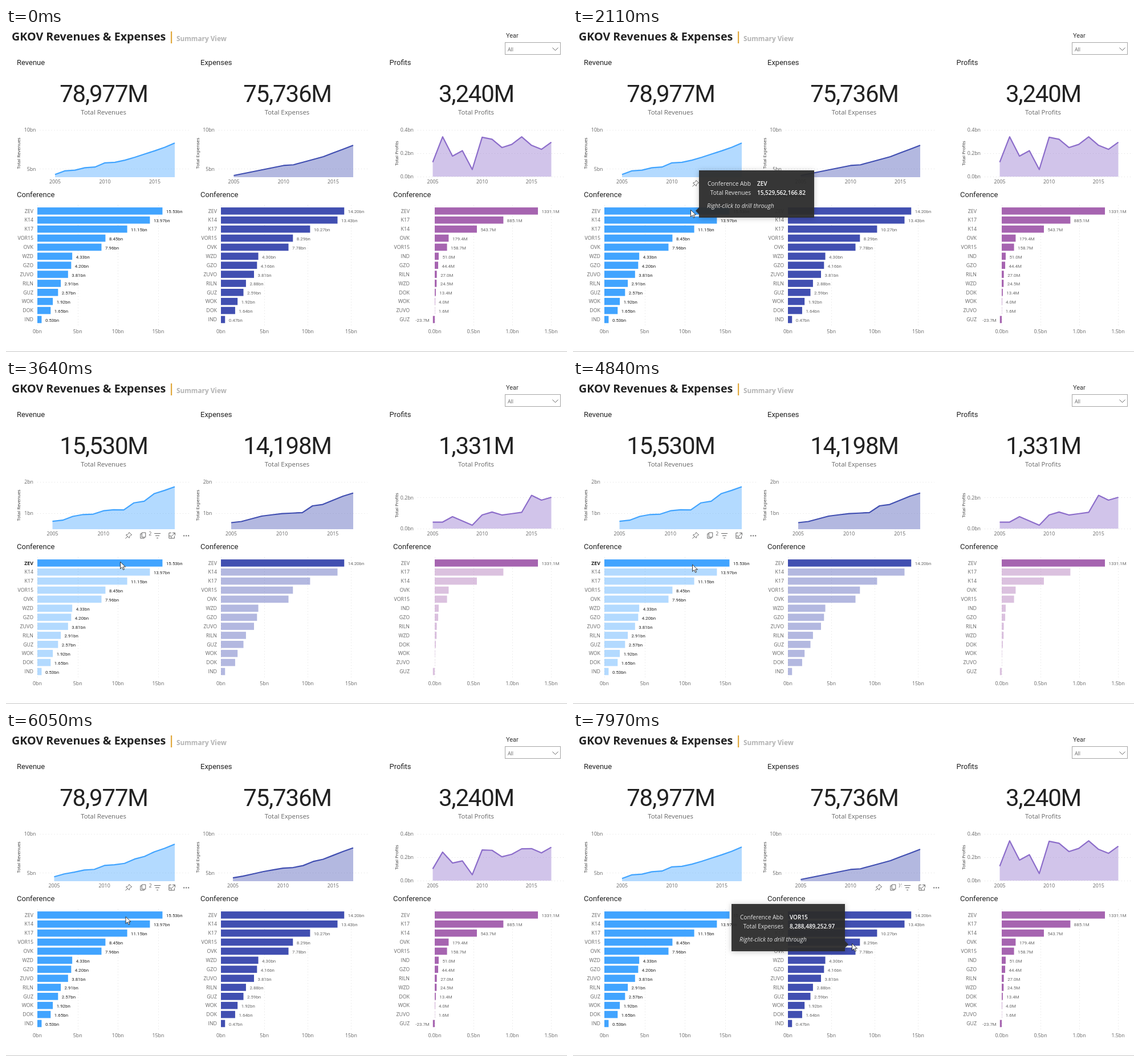
Recreate the animation shown at these times as an HTML page. Size 984 px wide and 569 px high, loop 8000 ms.

```html
<!DOCTYPE html>
<html lang="en">
<head>
<meta charset="utf-8">
<title>Revenues &amp; Expenses</title>
<style>
html, body { margin: 0; width: 100%; height: 100%; overflow: hidden; background: #fff; }
svg { display: block; width: 984px; height: 569px; }
text { font: 8.8px "Open Sans", "Noto Sans", sans-serif; fill: #666; white-space: pre; }
.title { font-size: 19.7px; font-weight: 700; fill: #222; }
.sub { font-size: 11.8px; font-weight: 700; fill: #b3b3b3; }
.head { font: 13px Roboto, sans-serif; fill: #222; }
.year { font: 11px Roboto, sans-serif; fill: #333; }
.card { font: 42px Roboto, sans-serif; fill: #222; letter-spacing: -1.2px; }
.caption { font-size: 11.4px; }
.side { font-size: 7.9px; fill: #333; }
.value { font: 7.9px Roboto, sans-serif; }
.dark { fill: #222; }
.bold { font-weight: 700; fill: #222; }
.tip { font-size: 10.2px; fill: #e6e6e6; }
.tipValue { font-size: 10px; font-weight: 600; fill: #fff; }
.tipHint { font-size: 10.4px; font-style: italic; fill: #e0e0e0; }
.grid { stroke: #dedede; stroke-dasharray: 1 4; }
.icon { fill: none; stroke: #666; }
</style>
</head>
<body>
<svg id="stage" viewBox="0 0 984 569"></svg>
<script>
const LOOP = 8000, SELECT = 3230, RESET = 5780;

// Conference: revenue in bn, profit in millions; expenses follow from both
const conferences = Object.entries({
  ZEV: [15.53, 1331.1], K14: [13.97, 543.7], K17: [11.153, 885.1], VOR15: [8.45, 158.7],
  OVK: [7.96, 179.4], WZD: [4.328, 24.5], GZO: [4.2, 44.4], ZUVO: [3.81, 1.6], RILN: [2.91, 27],
  GUZ: [2.57, -23.7], WOK: [1.92, 4], DOK: [1.65, 13.4], IND: [.5255, 51]
}).map(([name, [revenue, profit]]) => ({ name, revenue, profit, expenses: revenue - profit / 1000 }));

// Key points by year since 2005, in bn: all conferences, then the selected one
const history = [
  {
    expenses: { 0: 4.16, 5: 5.44, 6: 5.53, 9: 6.57, 12: 8.03 },
    profit: { 0: .124, 1: .341, 2: .176, 3: .222, 4: .061, 5: .337, 6: .32, 7: .249, 8: .276, 9: .341, 10: .268, 11: .234, 12: .295 }
  },
  {
    expenses: { 0: .7, 1: .736, 3: .909, 5: .99, 7: 1.02, 8: 1.236, 9: 1.28, 11: 1.545, 12: 1.645 },
    profit: { 0: .042, 1: .042, 2: .077, 4: .022, 5: .088, 6: .107, 7: .088, 9: .105, 10: .215, 11: .184, 12: .202 }
  }
];

// Axis scales: y of zero, pixels per bn, tick step
const totals = [{ zero: 316, k: 13.7, step: 5 }, { zero: 289, k: 55, step: 1 }];
const margins = [{ zero: 261, k: 205, step: .2 }, { zero: 261, k: 272, step: .2 }];

const bn = v => v.toFixed(2) + 'bn';
const panels = [
  {
    key: 'revenue', word: 'Revenue', cards: ['78,977M', '15,530M'], headX: 19, confX: 19, mid: 171.5,
    line: '#41a4ff', bar: '#41a4ff', start: 86, end: 296, shift: 4.5, scales: totals, digits: 0,
    x0: 55, unit: 14.13, step: 5, format: bn
  },
  {
    key: 'expenses', word: 'Expenses', cards: ['75,736M', '14,198M'], headX: 341, confX: 341, mid: 493.5,
    line: '#414fb1', bar: '#414fb1', start: 399.5, end: 609, shift: 4.5, scales: totals, digits: 0,
    x0: 377, unit: 15.23, step: 5, format: bn
  },
  {
    key: 'profit', word: 'Profits', cards: ['3,240M', '1,331M'], headX: 672.5, confX: 679, mid: 825,
    line: '#8c6dca', bar: '#a664b0', start: 748.5, end: 956.5, shift: 0, scales: margins, digits: 1,
    x0: 752, unit: .136, step: 500, format: v => v.toFixed(1) + 'M'
  }
];

// Pointer moves: start, end, x, y
const moves = [
  [800, 1150, 328, 326], [1150, 1570, 216, 318], [1570, 1710, 206, 319], [2110, 2310, 200, 319],
  [4300, 4910, 209.5, 324], [6600, 6670, 236, 318], [6670, 7080, 480, 374], [7760, 7970, 489, 371]
];
const tips = [[2110, SELECT], [5310, RESET], [7500, LOOP]];
const clicks = [[2780, 2970], [5380, 5580]];

const clamp = v => Math.max(0, Math.min(1, v));
const mix = (a, b, p) => a + (b - a) * p;
const easeOut = p => p * (2 - p);
const smooth = p => p * p * (3 - 2 * p);
const within = (t, spans) => spans.some(([a, b]) => t >= a && t < b);

const text = (x, y, str, cls = '', anchor = 'start') =>
  `<text x="${x}" y="${y}" class="${cls}" text-anchor="${anchor}">${str}</text>`;
const rect = (x, y, w, h, fill, extra = '') =>
  `<rect x="${x}" y="${y}" width="${w}" height="${h}" fill="${fill}" ${extra}/>`;
const path = (d, attrs) => `<path d="${d}" ${attrs}/>`;

function sample(points, i) {
  const keys = Object.keys(points).map(Number);
  const b = keys.find(k => k >= i), a = keys.filter(k => k <= i).pop();
  return a === b ? points[a] : mix(points[a], points[b], (i - a) / (b - a));
}

function amount(key, view, i) {
  const { expenses, profit } = history[view];
  if (key === 'revenue') return sample(expenses, i) + sample(profit, i);
  return sample(history[view][key], i);
}

function header() {
  return text(10, 22.4, 'GKOV Revenues &amp; Expenses', 'title') +
    rect(289, 6, 2.2, 21, '#e0a83c') + text(299, 22.5, 'Summary View', 'sub') +
    text(877, 17, 'Year', 'year') +
    rect(875.5, 25.5, 97, 21, '#fff', 'stroke="#a6a6a6"') + text(880, 40.7, 'All') +
    path('M958.5 34.5l5 5 5-5', 'class="icon"') + rect(0, 568, 984, 1, '#c6c6c6');
}

function area(p, morph, view) {
  const base = p.digits ? 261 : 262, x0 = p.start - p.shift * morph, dx = (p.end - x0) / 12;
  const height = (v, i) => p.scales[v].zero - amount(p.key, v, i) * p.scales[v].k;
  const pts = Array.from({ length: 13 }, (_, i) =>
    `${x0 + dx * i} ${mix(height(0, i), height(1, i), morph)}`).join('L');
  const { zero, k, step } = p.scales[view], edge = p.start - p.shift * view - 33.5;
  let out = '';
  for (let v = 0; zero - v * k > 178; v += step) {
    const y = zero - v * k;
    if (y > base) continue;
    out += path(`M${edge + 7} ${Math.floor(y) + .5}H${p.end + 25}`, 'class="grid"') +
      text(edge, y + 3.2, v.toFixed(p.digits) + 'bn', '', 'end');
  }
  out += path(`M${pts}V${base}H${x0}Z`, `fill="${p.line}" fill-opacity=".4"`) +
    path(`M${pts}`, `fill="none" stroke="${p.line}" stroke-width="2.2" stroke-linejoin="round"`);
  for (let i = 0; i < 12; i += 5) out += text(x0 + dx * i, 273.2, 2005 + i, '', 'middle');
  return out + `<g transform="translate(${p.start - 61} 220) rotate(-90)">${text(0, 0, caption(p), 'side', 'middle')}</g>`;
}

const caption = p => 'Total ' + p.word.replace(/e$/, 'es');

function bars(p, dim, selected) {
  const first = p.key === 'revenue', money = p.key === 'profit';
  const rows = money ? [...conferences].sort((a, b) => b.profit - a.profit) : conferences;
  let out = '';
  for (let i = 0; i < 4; i++) {
    const x = p.x0 + i * p.step * p.unit;
    const label = money ? (i / 2).toFixed(1) : i * p.step;
    out += path(`M${Math.round(x) + .5} 311V523`, 'class="grid"') + text(x, 536.4, label + 'bn', '', 'middle');
  }
  rows.forEach((row, i) => {
    const v = row[p.key], y = 321.4 + i * 15.88, w = v * p.unit;
    out += rect(p.x0 + Math.min(0, w), y - 6.3, Math.abs(w), 12.6, p.bar, i ? `opacity="${1 - .6 * dim}"` : '') +
      text(p.x0 - (money ? 44 : 7), y + 3.2, row.name, first && selected && !i ? 'bold' : '', 'end');
    if (first || !selected || !i)
      out += text(p.x0 + w + (v < 0 ? -6 : 6.5), y + 4, p.format(v), first ? 'value dark' : 'value', v < 0 ? 'end' : 'start');
  });
  return out;
}

function toolbar(x) {
  const icons = [
    'M1-5.5L5.5-1 4-.5 1.5 2 1 4.5-4.5-1-2-1.5.5-4ZM-1.8 1.8L-5.5 5.5',
    'M-2-5H4.5V3H-2ZM-2-3H-4.5V5H2V3',
    'M-5.5-3.5H5.5M-3.5 .5H3.5M-1.5 4.5H1.5',
    'M-1-4.5H-5V5H4.5V1M1-4.5H5.5V0M5.5-4.5L0 1M-5 1H-1V5',
    'M-5 .5h2M-1 .5h2M3 .5h2'
  ];
  return icons.map((d, i) => `<g transform="translate(${x + i * 25.3} 273)">` +
    rect(-10.3, -9, 20.6, 19, '#fff') + path(d, `class="icon" stroke-width="${i > 3 ? 1.8 : 1}"`) + '</g>').join('');
}

function tooltip(x, y, onLeft) {
  const w = onLeft ? 199 : 202, left = onLeft ? x - 12 - w : x + 15;
  const edge = onLeft ? w : 0, point = onLeft ? w + 6 : -6;
  const [name, label, value] = onLeft
    ? ['VOR15', 'Total Expenses', '8,288,489,252.97']
    : ['ZEV', 'Total Revenues', '15,529,562,166.82'];
  return `<g transform="translate(${left} ${y - 69})">` +
    path(`M0 0H${w}V83H0ZM${edge} 65L${point} 71L${edge} 77Z`,
      'fill="#2d2d2d" fill-opacity=".94" style="filter:drop-shadow(0 1px 5px rgba(0,0,0,.25))"') +
    text(91, 26.5, 'Conference Abb', 'tip', 'end') + text(102, 26.5, name, 'tipValue') +
    text(91, 42.5, label, 'tip', 'end') + text(102, 42.5, value, 'tipValue') +
    text(14, 65.5, 'Right-click to drill through', 'tipHint') + '</g>';
}

function pointer(t) {
  let x = 800, y = 532;
  for (const [a, b, tx, ty] of moves) {
    if (t < a) break;
    const n = Math.round((b - a) / 70);
    const p = easeOut(clamp(Math.floor((t - a) / (b - a) * n) / n));
    x = mix(x, tx, p);
    y = mix(y, ty, p);
  }
  return [x, y];
}

function scene(t) {
  const ramp = (delay, time) =>
    smooth(clamp((t - SELECT - delay) / time)) - smooth(clamp((t - RESET - delay) / time));
  const selected = t >= SELECT && t < RESET;
  const view = t >= SELECT + 140 && t < RESET + 140 ? 1 : 0;
  const dim = ramp(0, 200), morph = ramp(70, 330);
  let out = header();
  for (const p of panels) {
    out += text(p.headX, 65, p.word, 'head') + text(p.confX, 296.7, 'Conference', 'head') +
      text(p.mid, 130, p.cards[view], 'card', 'middle') +
      text(p.mid - .5, 152, caption(p), 'caption', 'middle') +
      area(p, morph, view) + bars(p, dim, selected);
  }
  if (t < 800) return out;
  const [x, y] = pointer(t);
  out += toolbar(x < 322 ? 215 : x < 650 ? 536 : 874);
  if (within(t, tips)) out += tooltip(x, y, x > 322);
  if (within(t, clicks)) out += `<circle cx="${x + .5}" cy="${y + .5}" r="10.5" fill="#ff0" opacity=".4"/>`;
  return out + path('M0 0V12L3 9.3 5 13.8 7 13 5.1 8.6H9Z',
    `transform="translate(${x + .5} ${y + .5})" fill="#fff" stroke="#222" stroke-width=".9"`);
}

const stage = document.getElementById('stage');
let last = '';
function draw() {
  const html = scene(performance.now() % LOOP);
  if (html !== last) stage.innerHTML = last = html;
  requestAnimationFrame(draw);
}
draw();
</script>
</body>
</html>
```
